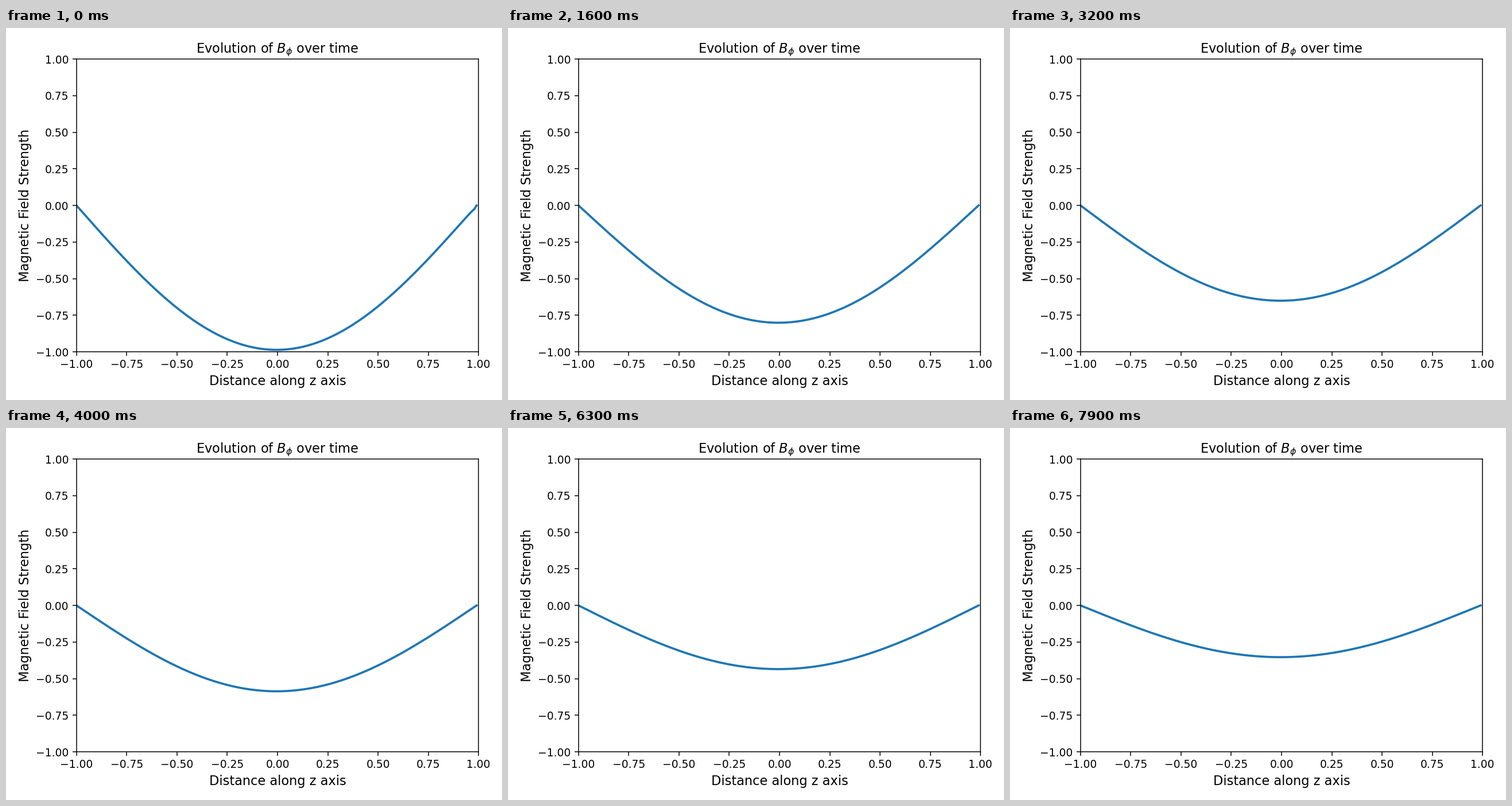
A matplotlib script for the animation above (8000 ms loop, 864x648 px).

```python
import numpy as np
import matplotlib.pyplot as plt
from matplotlib.animation import FuncAnimation

WIDTH, HEIGHT, DPI = 864, 648, 135
FRAMES, INTERVAL = 80, 100   # 8 s loop
AMPLITUDE = 0.986
DECAY = 0.13                 # per second

# The grid stops one cell short of z = 1; the field is zero at both ends.
z = np.linspace(-1, 0.99, 200)
mode = np.sin(np.pi * (z + 1) / 1.99)
edge = 0.012 * np.exp((z - 0.99) / 0.02)
edge[-1] = 0


def field(t):
    """Slowly decaying sine mode with a short-lived layer at the right end."""
    return -AMPLITUDE * np.exp(-DECAY * t) * mode - edge * np.exp(-10 * t)


plt.rcParams["font.family"] = "DejaVu Sans"
fig, ax = plt.subplots(figsize=(WIDTH / DPI, HEIGHT / DPI), dpi=DPI)
fig.subplots_adjust(left=122.8 / WIDTH, right=823.2 / WIDTH,
                    bottom=1 - 564.2 / HEIGHT, top=1 - 54.0 / HEIGHT)
line, = ax.plot(z, field(0), color="#1f77b4", lw=2)

ticks = np.linspace(-1, 1, 9)
ax.set(xlim=(-1, 1), ylim=(-1, 1), xticks=ticks, yticks=ticks)
ax.set_title(r"Evolution of $B_\phi$ over time", fontsize=12)
ax.set_xlabel("Distance along z axis", fontsize=12)
ax.set_ylabel("Magnetic Field Strength", fontsize=12)


def update(frame):
    line.set_ydata(field(frame * INTERVAL / 1000))
    return line,


anim = FuncAnimation(fig, update, frames=FRAMES, interval=INTERVAL,
                     repeat=True, repeat_delay=0)
plt.show()
```
